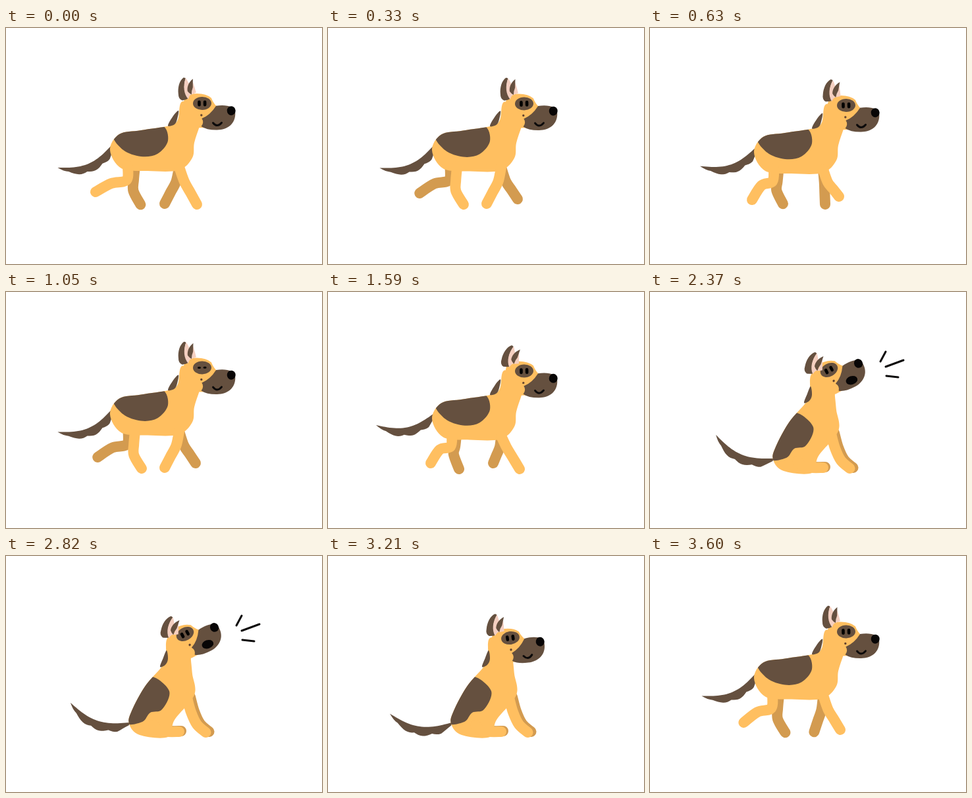
Write an HTML page that moves like this. It is 480 by 360 pixels and loops after 3630 ms.

```html
<!DOCTYPE html>
<html lang="en">
<head>
<meta charset="utf-8">
<title>Trotting dog</title>
<style>
html, body { margin: 0; width: 100%; height: 100%; overflow: hidden; background: #fff; }
svg { display: block; width: 100%; height: 100%; }
.fur { fill: #ffbf60; }
.dark { fill: #65503f; }
.pink { fill: #f4cfc0; }
.leg { fill: none; stroke: #ffbf60; stroke-width: 16; stroke-linecap: round; stroke-linejoin: round; }
.far { stroke: #d39b50; }
.ink { fill: none; stroke: #0c0a0a; stroke-width: 3; stroke-linecap: round; }
</style>
</head>
<body>
<svg viewBox="0 0 480 360">
  <defs><clipPath id="inside"><path id="clip"/></clipPath></defs>
  <path id="rays" class="ink"/>
  <path id="tail" class="dark"/>
  <path id="farHind" class="leg far"/>
  <path id="farFront" class="leg far"/>
  <path id="torso" class="fur"/>
  <g clip-path="url(#inside)"><path id="saddle" class="dark"/></g>
  <path id="mane" class="dark"/>
  <path id="hind" class="leg"/>
  <path id="front" class="leg"/>
  <g id="head">
    <path class="fur" d="M-28-3Q-25-16-12-15Q5-16 14-8Q17 0 22 5L5 37L-8 37Q-27 30-28-3Z"/>
    <path class="dark" d="M21 4C36 2 50 5 50 16C50 32 38 41 22 41Q6 41-2 35Q3 29-1 23Q12 18 21 4Z"/>
    <ellipse class="dark" rx="14" ry="10"/>
    <g id="eyes"><rect x="-6.8" y="-4.5" width="4.6" height="9" rx="2.3"/><rect x="1.8" y="-4.5" width="4.6" height="9" rx="2.3"/></g>
    <circle cx="-1.5" cy="18" r="1.7" fill="#65452f"/>
    <ellipse cx="44" cy="12" rx="6.5" ry="7" fill="#080606"/>
    <path id="smile" class="ink" d="M16 30Q22 38 29 30"/>
    <ellipse id="mouth" cx="23" cy="30" rx="9" fill="#080606" transform="rotate(10 23 30)"/>
  </g>
  <g id="ear">
    <path class="dark" d="M-4-29C-11-24-13-13-12-4Q-12 4-6 6Q0 5 3 3Q-2-4-3-14Q-3-22-1-28Z"/>
    <path class="pink" d="M-1-28C2-25 3-20 7-17L8-3Q5-3 3 4C-4-4-5-16-1-28Z"/>
    <path class="pink" d="M10-22Q13-13 15-6L8-3Z"/>
    <path class="dark" d="M10-27C3-21 1-14 2-8Q4-5 8-3Q8-9 10-14Z"/>
  </g>
</svg>
<script>
const LOOP = 3630, STEP = 30, CYCLE = 24;
const $ = id => document.getElementById(id);
const set = (id, k, v) => $(id).setAttribute(k, v);
const draw = (id, d) => set(id, 'd', d);
const show = (id, on) => set(id, 'visibility', on ? 'visible' : 'hidden');
const mix = (a, b, k) => a + (b - a) * k;
const blend = (a, b, k) => a.map((v, i) => mix(v, b[i], k));
const shift = (pts, x, y) => pts.map((v, i) => v + (i % 2 ? y : x));
const clamp = x => Math.max(0, Math.min(1, x));
const ease = (t, a, b) => { const k = clamp((t - a) / (b - a)); return k * k * (3 - 2 * k); };
const pulse = (t, a, b) => ease(t, a, a + 100) * (1 - ease(t, b - 100, b));
const wave = p => Math.cos(p * Math.PI / 6);
const turn = (x, y, deg) => {
  const a = deg * Math.PI / 180, c = Math.cos(a), s = Math.sin(a);
  return [x * c - y * s, x * s + y * c];
};

// Smooth curve through flat x,y points.
function curve(flat, closed) {
  const n = flat.length / 2;
  const at = i => {
    i = closed ? (i + n) % n : Math.max(0, Math.min(n - 1, i));
    return [flat[2 * i], flat[2 * i + 1]];
  };
  const f = v => v.toFixed(2);
  let d = 'M' + at(0).map(f);
  for (let i = 0; i < (closed ? n : n - 1); i++) {
    const [a, b, c, e] = [at(i - 1), at(i), at(i + 1), at(i + 2)];
    const h1 = b.map((v, j) => f(v + (c[j] - a[j]) / 6));
    const h2 = c.map((v, j) => f(v - (e[j] - b[j]) / 6));
    d += 'C' + h1 + ' ' + h2 + ' ' + c.map(f);
  }
  return d + (closed ? 'Z' : '');
}

// Each outline as [standing, sitting].
const torso = [
  [268,112, 261,140, 248,149, 205,156, 172,162, 158,186, 175,214, 215,218, 262,217, 283,198, 286,175, 294,150, 300,130],
  [246,125, 243,158, 235,171, 211,199, 191,236, 187,256, 203,273, 246,276, 256,250, 286,212, 283,180, 281,160, 278,135]
];
const saddle = [
  [164,163, 205,153, 238,149, 246,172, 230,192, 205,196, 178,186],
  [183,253, 203,205, 221,184, 248,206, 237,234, 219,239, 207,253]
];
const mane = [
  [262,126, 254,134, 246,149, 256,147, 260,139],
  [244,144, 239,155, 234,169, 242,166, 246,157]
];
const sitHind = [224,258, 232,266, 246,268, 263,268];
const sitFront = [275,216, 281,238, 290,257, 303.5,269];

// Paw path over one stride: phase, x, y.
const hindPath = [[0, 136, 250], [5, 156, 261], [10, 207, 269], [17.5, 199, 270], [21, 155, 262]];
const frontPath = [[0, 290, 269], [5, 291, 270], [11, 241, 268], [16, 251, 261], [21, 287, 257]];

function paw(path, p) {
  p = (p % CYCLE + CYCLE) % CYCLE;
  const i = path.findLastIndex(k => k[0] <= p);
  const a = path[i], b = path[(i + 1) % path.length];
  return blend(a, b, (p - a[0]) / ((b[0] || CYCLE) - a[0])).slice(1);
}

// Hip, knee and ankle follow the paw.
function hindLeg(p, drop) {
  const [x, y] = paw(hindPath, p), u = x - 136, hip = 185 + 0.16 * u;
  return [hip, 210 + drop, hip - 2, 232 + drop / 2, 160 + 0.49 * u, 237 + 0.17 * u, x, y];
}
function frontLeg(p, drop) {
  const [x, y] = paw(frontPath, p);
  const kx = 264 + 0.25 * (x - 263), ky = 234 + drop / 3;
  return [263, 212 + drop, kx, ky, (kx + x) / 2, (ky + y) / 2, x, y];
}

// A sagging upper edge and a scalloped lower one; lift in degrees.
function tailPath(x, y, len, lift) {
  const upper = [], lower = [], n = 28;
  for (let i = 0; i <= n; i++) {
    const u = i / n;
    const sag = 13 * Math.sin(Math.PI * u);
    const thick = (11 + 3 * Math.abs(Math.sin(3.5 * Math.PI * u))) * (1 - u ** 6) * Math.min(1, 0.4 + 4 * u);
    const point = h => turn(-len * u, h, lift).map((v, j) => v + (j ? y : x));
    upper.push(point(sag));
    lower.unshift(point(sag + thick));
  }
  return 'M' + [...upper, ...lower].map(q => q.map(v => v.toFixed(2))).join('L') + 'Z';
}

const rays = [[350, 106, 358, 91], [358, 114, 385, 104], [359, 128, 377, 130]];

function render(t) {
  const sit = ease(t, 1630, 2070) * (1 - ease(t, 3250, 3490));
  const p = t < 2500 ? Math.min(t / STEP, 54) : Math.max((t - LOOP) / STEP, -8);
  const bark = Math.max(pulse(t, 2230, 2530), pulse(t, 2710, 3010));
  const beat = wave(p);
  const drop = 4 * (1 - beat) * (1 - sit);

  const shape = s => curve(shift(blend(...s, sit), 0, drop), true);
  const body = shape(torso);
  draw('torso', body);
  draw('clip', body);
  draw('saddle', shape(saddle));
  draw('mane', shape(mane));

  const leg = (id, walk, rest) => draw(id, curve(blend(walk, rest, sit)));
  leg('hind', hindLeg(p, drop), sitHind);
  leg('farHind', hindLeg(p + 12.5, drop), shift(sitHind, 3, -1));
  leg('front', frontLeg(p, drop), sitFront);
  leg('farFront', frontLeg(p + 11, drop), shift(sitFront, 5, -1));

  const wag = Math.cos((t - 2330) / 600 * 2 * Math.PI);
  const lift = mix(-17.5 - 6 * wave(p + 0.5), 15.5 + 7.5 * wag, sit);
  draw('tail', tailPath(mix(162, 188, sit), mix(177, 254, sit) + drop, mix(91, 95, sit), lift));

  const hx = mix(298, 277 - 5 * bark, sit) + 5 * pulse(t, 3380, 3580);
  const hy = mix(118 - 3 * beat, 125 - 6 * bark, sit);
  const tilt = mix(-1, -8 - 20 * bark, sit);
  set('head', 'transform', `translate(${hx} ${hy}) rotate(${tilt})`);
  const [ex, ey] = turn(-24, -11, tilt);
  const flap = mix(10 - 10 * beat, 12 + 6 * bark, sit);
  set('ear', 'transform', `translate(${hx + ex} ${hy + ey}) rotate(${flap})`);

  const lid = Math.max(0.12, clamp(Math.abs(t - 1080) / 90));
  set('eyes', 'transform', `scale(1 ${lid})`);
  show('smile', bark <= 0.3);
  show('mouth', bark > 0.3);
  set('mouth', 'ry', 6.5 * bark);

  const grow = clamp((bark - 0.4) / 0.6);
  show('rays', grow > 0.05);
  draw('rays', rays.map(([a, b, c, d]) => `M${a} ${b}L${mix(a, c, grow)} ${mix(b, d, grow)}`).join(''));
}

let start;
function tick(now) {
  start ??= now;
  const t = Math.max(0, now - start) % LOOP;
  render(Math.floor(t / STEP) * STEP);
  requestAnimationFrame(tick);
}
render(0);
requestAnimationFrame(tick);
</script>
</body>
</html>
```
